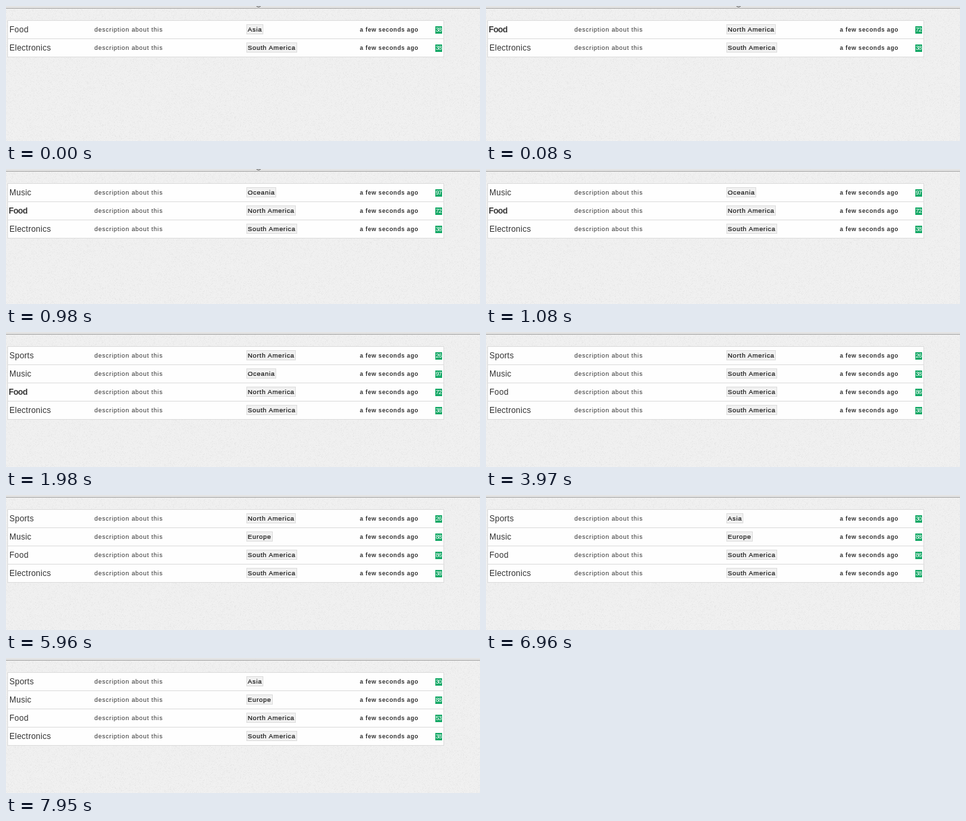
An HTML page with a canvas that plays this animation: 700x200 px, repeating every 8000 ms.

```html
<!DOCTYPE html>
<html lang="en">
<head>
<meta charset="utf-8">
<title>Live list</title>
<style>
  html, body { margin: 0; width: 100%; height: 100%; overflow: hidden; background: #eee; }
  body { position: relative; font: 9px/26px "Liberation Sans", Arial, sans-serif; color: #333; }
  #linen { position: absolute; left: 0; top: 0; }
  #bar { position: absolute; left: 0; top: 0; width: 100%; height: 3px; background: #e3e3e3; border-bottom: 1px solid #a9a9a9; }
  #tail { position: absolute; left: 369px; top: -5px; width: 6px; height: 5px; border: 1px solid #555; border-radius: 0 0 4px 4px; }
  #clip { position: absolute; left: 0; top: 0; width: 100%; height: 3px; overflow: hidden; }
  .row { position: absolute; left: 2px; width: 645px; height: 28px; box-sizing: border-box; border: 1px solid #ddd; background: #fefefe; }
  .row span { position: absolute; top: 0; white-space: pre; }
  .row .name { left: 2px; font-size: 12px; letter-spacing: .25px; }
  .row .name.bold { left: 1px; font-weight: bold; letter-spacing: -.4px; }
  .row .note { left: 127.6px; letter-spacing: .73px; color: #2c2c2c; }
  .row .place { left: 352px; top: 5px; padding: 0 1px; border: 1px solid #ddd; background: #f1f1f1; font-size: 9.5px; line-height: 13px; letter-spacing: .68px; color: #111; -webkit-text-stroke: .2px #111; }
  .row .ago { left: 519.6px; font-size: 8.7px; font-weight: bold; letter-spacing: .55px; }
  .row .count { left: 631px; top: 8px; width: 10px; height: 11px; background: #14a866; color: #fff; font-size: 9px; line-height: 11px; letter-spacing: -.8px; text-indent: .6px; }
</style>
</head>
<body>
<canvas id="linen" width="700" height="200"></canvas>
<div id="bar"></div>
<div id="clip"><div id="tail"></div></div>
<div id="list"></div>
<script>
const LOOP = 8000;
const START = [
  { name: "Food", place: "Asia", count: 38 },
  { name: "Electronics", place: "South America", count: 38 }
];

// Each event: time, row name, changed fields. Unknown names join at the top.
const EVENTS = [
  [40, "Food", { place: "North America", count: 72 }],
  [80, "Food", { bold: true }],
  [980, "Music", { place: "Oceania", count: 97 }],
  [1980, "Sports", { place: "North America", count: 26 }],
  [2980, "Food", { place: "South America", count: 86, bold: false }],
  [3060, "Music", { bold: true }],
  [3970, "Music", { place: "South America", count: 38, bold: false }],
  [4960, "Music", { place: "Asia", count: 58 }],
  [5960, "Music", { place: "Europe", count: 88 }],
  [6960, "Sports", { place: "Asia", count: 30 }],
  [7950, "Food", { place: "North America", count: 53 }]
];
const TITLE_END = 1080;

const list = document.getElementById("list");
const tail = document.getElementById("tail");

function rowsAt(t) {
  const rows = START.map(r => ({ ...r }));
  for (const [at, name, change] of EVENTS) {
    if (at > t) break;
    const row = rows.find(r => r.name === name);
    if (row) Object.assign(row, change);
    else rows.unshift({ name, ...change });
  }
  return rows;
}

function rowHtml(row, i) {
  const cell = (cls, text) => `<span class="${cls}">${text}</span>`;
  return `<div class="row" style="top:${21 + 27 * i}px">` +
    cell(row.bold ? "name bold" : "name", row.name) +
    cell("note", "description about this") +
    cell("place", row.place) +
    cell("ago", "a few seconds ago") +
    cell("count", row.count) + "</div>";
}

// Light cloth: alternating threads with scattered darker knots.
function weave() {
  const ctx = document.getElementById("linen").getContext("2d");
  const img = ctx.createImageData(700, 200);
  let seed = 7;
  const rand = () => (seed = (seed * 1664525 + 1013904223) >>> 0) / 4294967296;
  for (let p = 0; p < 700 * 200; p++) {
    const x = p % 700, y = (p / 700) | 0;
    const thread = (x + y) % 2 ? 2 : -2;
    const knot = rand() < .12 ? -7 : 0;
    const v = 239.5 + thread + knot + (rand() - .5) * 4;
    img.data.set([v, v, v, 255], p * 4);
  }
  ctx.putImageData(img, 0, 0);
}

let shown = "";
function draw(t) {
  const html = rowsAt(t).map(rowHtml).join("");
  if (html !== shown) list.innerHTML = shown = html;
  tail.style.visibility = t < TITLE_END ? "visible" : "hidden";
}

weave();
draw(0);
const begin = performance.now();
function tick() {
  draw((performance.now() - begin) % LOOP);
  requestAnimationFrame(tick);
}
requestAnimationFrame(tick);
</script>
</body>
</html>
```
